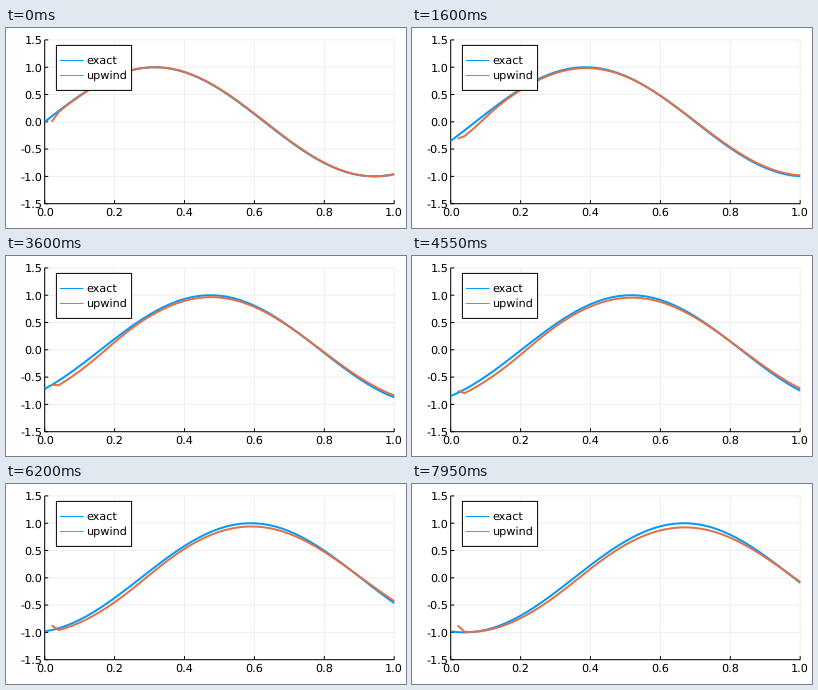
Animation, 400 px wide and 200 px high, one loop 8000 ms. Source, as a matplotlib script:

```python
import numpy as np
import matplotlib.pyplot as plt
from matplotlib.animation import FuncAnimation
from matplotlib.patches import Rectangle

W, H, DPI = 400, 200, 100
PX = 72 / DPI                      # one pixel in points
LEFT, RIGHT, TOP, BOTTOM = 38.7, 388.2, 11.9, 175.7
BLUE, ORANGE, GRID = "#009AFA", "#E36F47", "#EEEEEE"
FRAMES, DT = 160, 1 / 450
CELLS = 50
DX = 1 / CELLS
CFL = DT / DX
K = 5                              # wave number

plt.rcParams["font.family"] = "DejaVu Sans"
plt.rcParams["text.hinting"] = "none"


def sx(x):
    return LEFT + (RIGHT - LEFT) * x


def sy(y):
    return BOTTOM - (BOTTOM - TOP) * (y + 1.5) / 3


def exact(x, t):
    return np.sin(K * (x - t))


def solve(x):
    """First-order upwind steps; the inflow value is set before each step."""
    u = exact(x, 0)
    rows = []
    for n in range(FRAMES):
        u[0] = exact(0, n * DT)
        u = u - CFL * (u - np.concatenate(([0], u[:-1])))
        rows.append(u.copy())
    return rows


fig = plt.figure(figsize=(W / DPI, H / DPI), dpi=DPI, facecolor="white")
ax = fig.add_axes([0, 0, 1, 1])
ax.set_xlim(0, W)
ax.set_ylim(H, 0)
ax.axis("off")


def line(xs, ys, color, width=1, z=1):
    return ax.plot(xs, ys, color=color, lw=width * PX, zorder=z, snap=False,
                   solid_capstyle="butt", solid_joinstyle="round")[0]


def label(x, y, s, ha, z=4):
    ax.text(x, y, s, ha=ha, va="baseline", fontsize=11.2 * PX,
            color="black", zorder=z)


# grid, ticks and tick labels
for v in np.arange(6) / 5:
    x = sx(v)
    line([x, x], [TOP, BOTTOM], GRID)
    line([x, x], [BOTTOM - 3.5, BOTTOM], "black", z=2)
    label(x, 188.3, f"{v:.1f}", "center")
for v in np.arange(-3, 4) / 2:
    y = sy(v)
    line([LEFT, RIGHT], [y, y], GRID)
    line([LEFT, LEFT + 3.5], [y, y], "black", z=2)
    label(36.3, y + 4.2, f"{v:.1f}", "right")
line([LEFT, LEFT], [TOP, BOTTOM], "black", z=2)
line([LEFT, RIGHT], [BOTTOM, BOTTOM], "black", z=2)

# legend
ax.add_patch(Rectangle((50.4, 17.4), 75.2, 45, fc="white", ec="black",
                       lw=PX, zorder=5, snap=False))
for y, color, name in ((32.5, BLUE, "exact"), (47.5, ORANGE, "upwind")):
    line([54, 77.5], [y, y], color, z=6)
    label(80.3, y + 3.7, name, "left", z=6)

x_exact = np.linspace(0, 1, CELLS + 1)
x_cells = x_exact[1:]
states = solve(x_cells)
exact_line = line([], [], BLUE, 2, 3)
upwind_line = line([], [], ORANGE, 2, 3.1)


def draw(n):
    exact_line.set_data(sx(x_exact), sy(exact(x_exact, n * DT)))
    upwind_line.set_data(sx(x_cells), sy(states[n]))
    return exact_line, upwind_line


anim = FuncAnimation(fig, draw, frames=FRAMES, interval=50,
                     repeat=True, repeat_delay=0)
plt.show()
```
